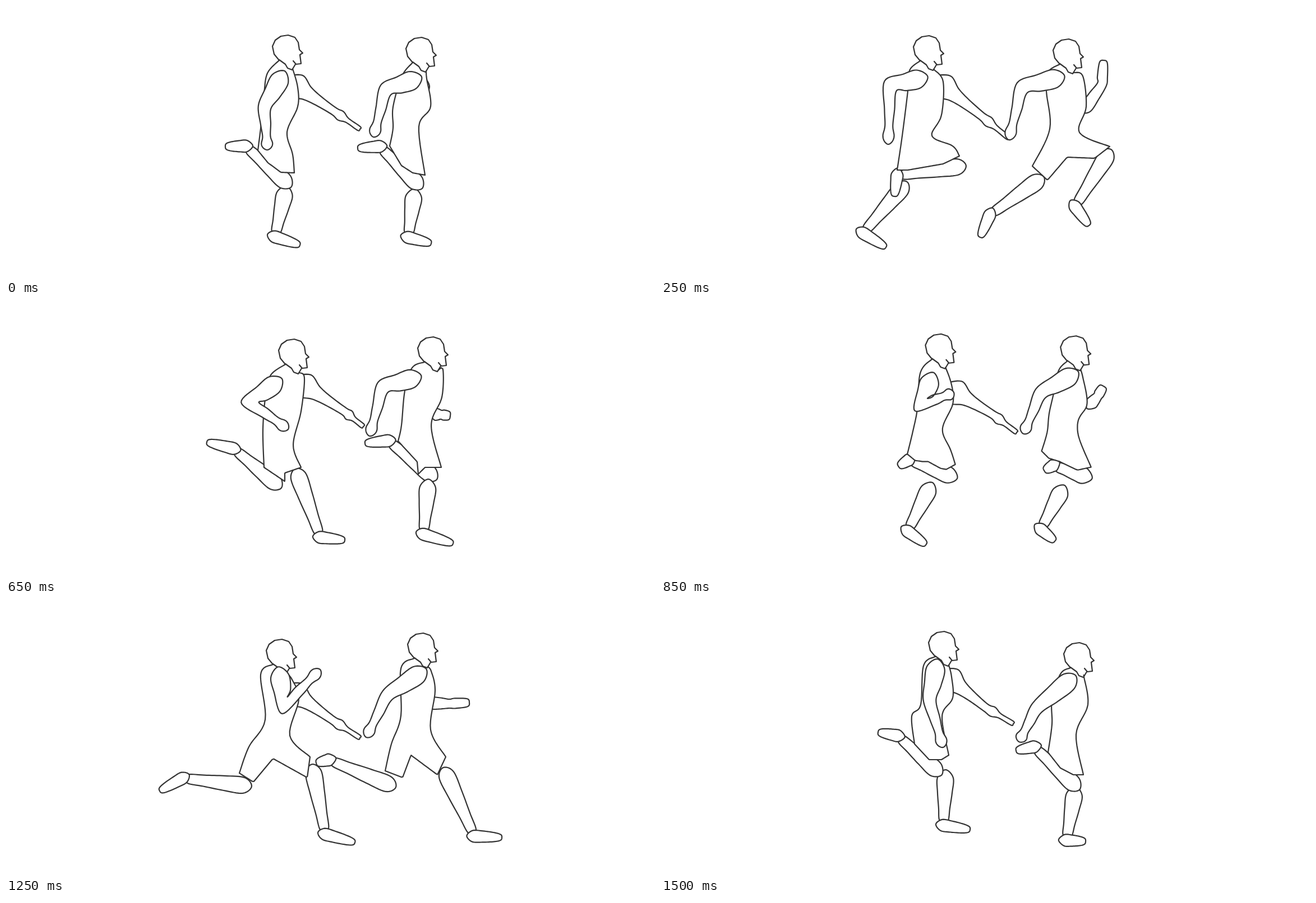
Animation, 1157 px wide and 484 px high, one loop 1.55 s. Source, as an HTML page with a canvas:

```html
<!DOCTYPE html>
<html lang="en">
<head>
<meta charset="utf-8">
<title>Relay runners</title>
<style>
html, body { margin: 0; height: 100%; overflow: hidden; background: #fff; }
canvas { display: block; }
</style>
</head>
<body>
<canvas id="stage" width="1157" height="484"></canvas>
<script>
const ctx = document.getElementById('stage').getContext('2d');
const LOOP = 1550, STEP = 50, SAMPLES = 50;

const points = text => text.split(' ').map(p => p.split(',').map(Number));
const add = (p, q, k = 1) => [p[0] + q[0] * k, p[1] + q[1] * k];
const sub = (p, q) => add(p, q, -1);
const lerp = (p, q, k) => add(p, sub(q, p), k);
const unit = p => { const d = Math.hypot(...p) || 1; return [p[0] / d, p[1] / d]; };

// Catmull-Rom curve through the points
function smooth(pts, closed) {
  const n = pts.length, out = [];
  const at = i => closed ? pts[(i + n) % n] : pts[Math.max(0, Math.min(n - 1, i))];
  for (let i = 0; i < (closed ? n : n - 1); i++) {
    const a = at(i - 1), b = at(i), c = at(i + 1), d = at(i + 2);
    for (let k = 0; k < 1; k += 0.125)
      out.push([0, 1].map(j => b[j] + k / 2 * (c[j] - a[j] +
        k * (2 * a[j] - 5 * b[j] + 4 * c[j] - d[j] + k * (3 * (b[j] - c[j]) + d[j] - a[j])))));
  }
  if (!closed) out.push(pts[n - 1]);
  return out;
}

// Evenly spaced points, so that lines of different poses can blend
function resample(pts) {
  const at = [0];
  for (let i = 1; i < pts.length; i++) at.push(at[i - 1] + Math.hypot(...sub(pts[i], pts[i - 1])));
  let i = 1;
  return Array.from({ length: SAMPLES }, (_, n) => {
    const d = at[at.length - 1] * n / (SAMPLES - 1);
    while (i < pts.length - 1 && at[i] < d) i++;
    return lerp(pts[i - 1], pts[i], (d - at[i - 1]) / (at[i] - at[i - 1] || 1));
  });
}

// Outline around a chain of joints; the profile holds [place along the chain, half width]
function tube(joints, profile) {
  const dirs = joints.slice(1).map((p, i) => unit(sub(p, joints[i])));
  const left = [], right = [];
  for (const [pos, half] of profile) {
    const i = Math.floor(pos);
    const c = lerp(joints[i], joints[i + 1], pos - i);
    let d = dirs[i], w = half;
    if (pos === i && i > 0) {
      d = unit(add(dirs[i - 1], d));
      w /= Math.max(0.7, d[0] * dirs[i][0] + d[1] * dirs[i][1]);
    }
    left.push(add(c, [d[1], -d[0]], w));
    right.unshift(add(c, [d[1], -d[0]], -w));
  }
  const cap = add(joints[0], dirs[0], -profile[0][1]);
  return smooth([...left, joints[joints.length - 1], ...right, cap], true);
}

const HEAD = points('-13,19 -22,8 -25,-6 -20,-17 -10,-24 3,-26 15,-22 21,-13 23,0 29,6 24,9 26,25 17,26 12,20');
const NECK = points('-13,18 -2,26 2,33 10,36 16,26');
const ARM = [[0, 16], [0.5, 15], [1, 11], [1.4, 9], [1.68, 7], [1.85, 10], [1.95, 7]];
const BATON_ARM = [[0, 22], [0.3, 13], [0.6, 9], [1, 7], [1.25, 9], [1.45, 5], [1.6, 4], [1.97, 4]];
const FREE_ARM = [[0, 10], [0.5, 10], [1, 8], [1.3, 9], [1.9, 7]];
const SHIN = [[0, 14], [0.35, 13], [0.7, 10], [0.97, 8]];
const SHOE = [[0, 10], [0.35, 10], [0.75, 8], [0.96, 5]];

// arm: shoulder, elbow, fingertips; legs: knee, ankle, toe; leg2 is further from the viewer
function runner(head, back, seat, chest, arm, far, leg, leg2) {
  const [h] = points(head);
  return {
    head: [h],
    back: resample(smooth([add(h, HEAD[0]), ...points(back)])),
    seat: resample(points(seat)),
    chest: resample(smooth([...points(chest), add(h, [11, 34])])),
    arm: points(arm), far: points(far), leg: points(leg), leg2: points(leg2)
  };
}

const stand = [
  runner('500,78', '466,120 460,157 455,210 449,258', '449,258 467,280 490,297 514,298',
    '514,298 511,265 501,225 520,180 520,145', '489,130 461,181 466,257',
    '516,142 585,188 631,220', '498,314 432,255 391,251', '497,335 481,405 524,427'),
  runner('738,82', '706,125 690,180 690,218 684,250', '684,250 705,285 725,298 747,302',
    '747,302 736,215 757,180 750,130', '726,132 677,150 655,234',
    '745,140 740,165 742,190', '732,316 671,256 627,254', '727,340 718,406 758,424')
];
const push = [
  runner('475,79', '443,115 440,152 430,232 421,293', '421,293 440,293 503,282 532,268',
    '532,268 520,250 483,232 500,195 503,135', '460,130 409,143 405,247',
    '502,142 572,197 620,236', '530,287 428,302 416,340', '430,325 365,400 401,431'),
  runner('724,85', '690,118 687,152 693,220 662,286', '662,286 689,311 724,270 773,272 800,251',
    '800,251 746,226 758,180 752,125', '704,129 644,146 620,239',
    '758,182 786,140 789,97', '795,268 742,352 763,392', '671,313 592,369 569,413')
];
const reach = [
  runner('471,79', '432,110 430,150 434,218 409,295', '409,295 432,314 465,279 528,291 537,262',
    '537,262 488,227 503,190 504,125', '443,127 378,141 389,234',
    '498,145 583,195 616,224', '542,282 524,388 572,420', '412,325 304,353 273,391'),
  runner('741,94', '703,122 697,162 700,220 680,320', '680,320 710,328 731,290 795,314 820,296',
    '820,296 756,243 771,200 767,135', '713,136 647,158 622,253',
    '775,185 805,160 811,112', '808,318 826,411 885,420', '690,337 584,326 537,353')
];
const land = [
  runner('511,87', '472,125 463,160 458,222 460,290', '460,290 497,315 497,300 526,290',
    '526,290 512,250 526,190 532,130', '479,141 435,174 503,222',
    '531,143 603,190 637,217', '521,305 558,408 604,420', '480,318 411,261 358,245'),
  runner('759,83', '724,112 711,153 705,215 699,243', '699,243 733,280 735,302 747,290 776,290',
    '776,290 758,215 777,165 779,115', '725,131 672,147 648,234',
    '764,195 776,196 792,198', '752,325 745,402 797,426', '757,303 687,247 640,247')
];
const drive = [
  runner('486,77', '452,115 456,195 435,245 411,290', '411,290 440,304 480,262 540,283 555,247',
    '555,247 505,215 521,165 508,128', '481,130 492,182 541,92',
    '518,167 581,202 631,238', '422,314 334,376 325,431', '564,278 495,348 516,395'),
  runner('735,79', '704,115 710,175 690,240 663,292', '663,292 691,306 733,268 790,284 823,254',
    '823,254 764,226 767,170 757,122', '735,123 682,168 644,226',
    '768,160 781,130 786,93', '672,318 573,361 543,415', '822,275 804,383 844,416')
];
const stride = [
  runner('489,89', '454,125 462,207 433,255 416,302', '416,302 441,318 476,276 537,310 542,273',
    '542,273 506,235 522,170 510,135', '488,128 497,181 560,117',
    '515,160 583,208 631,239', '424,324 322,312 274,334', '548,300 568,404 622,426'),
  runner('741,78', '704,115 704,200 687,250 676,298', '676,298 707,310 722,270 769,305 784,273',
    '784,273 757,225 765,155 758,120', '736,125 680,163 642,238',
    '758,177 790,178 826,176', '682,322 582,281 553,284', '785,305 832,408 884,417')
];
const rise = [
  runner('502,75', '468,110 463,180 447,200 452,250', '452,250 478,278 500,278 513,270',
    '513,270 501,200 520,168 518,130', '490,114 479,172 503,256',
    '515,134 579,185 628,214', '490,296 427,240 387,229', '507,310 504,388 551,403'),
  runner('743,95', '712,125 697,172 697,215 690,265', '690,265 712,293 735,305 753,305',
    '753,305 740,233 761,180 754,130', '727,138 670,186 638,246',
    '745,140 740,165 742,190', '736,322 670,260 633,262', '737,340 724,415 757,424')
];

const mix = (a, b, k) => a.map((r, i) => Object.fromEntries(Object.keys(r).map(
  part => [part, r[part].map((p, j) => lerp(p, b[i][part][j], k))])));

// Half a cycle after the stand: the same stance on the other leg
const passing = mix(land, drive, 0.33).map(({ arm, far }, i) =>
  ({ ...stand[i], arm, far, leg: stand[i].leg2, leg2: stand[i].leg }));

const keys = [
  [0, stand], [250, push], [400, mix(reach, land, -0.18)], [450, reach],
  [650, land], [780, passing], [1050, drive], [1200, mix(stride, rise, -0.15)],
  [1250, stride], [1500, rise], [LOOP, stand]
];

function draw(pts, closed, filled = true) {
  ctx.beginPath();
  pts.forEach(p => ctx.lineTo(...p));
  if (closed) ctx.closePath();
  if (filled) ctx.fill();
  ctx.stroke();
}

function drawLeg([knee, ankle, toe]) {
  const heel = add(add(ankle, unit(sub(ankle, knee)), 8), unit(sub(toe, ankle)), -4);
  draw(tube([knee, ankle], SHIN), true);
  draw(tube([heel, toe], SHOE), true);
}

function drawRunner(r, i) {
  const place = pts => pts.map(p => add(p, r.head[0]));
  draw(tube(r.far, i ? FREE_ARM : BATON_ARM), true);
  drawLeg(r.leg2);
  drawLeg(r.leg);
  draw([...r.back, ...r.seat, ...r.chest]);
  draw(place(HEAD));
  draw(place(NECK), false, false);
  draw(tube(r.arm, ARM), true);
}

function frame() {
  const t = Math.floor(performance.now() % LOOP / STEP) * STEP;
  const i = keys.findIndex(k => k[0] > t);
  const [t0, a] = keys[i - 1], [t1, b] = keys[i];
  ctx.clearRect(0, 0, 1157, 484);
  ctx.fillStyle = '#fff';
  ctx.strokeStyle = '#333';
  ctx.lineWidth = 2.2;
  ctx.lineJoin = ctx.lineCap = 'round';
  mix(a, b, (t - t0) / (t1 - t0)).forEach(drawRunner);
  requestAnimationFrame(frame);
}
frame();
</script>
</body>
</html>
```
